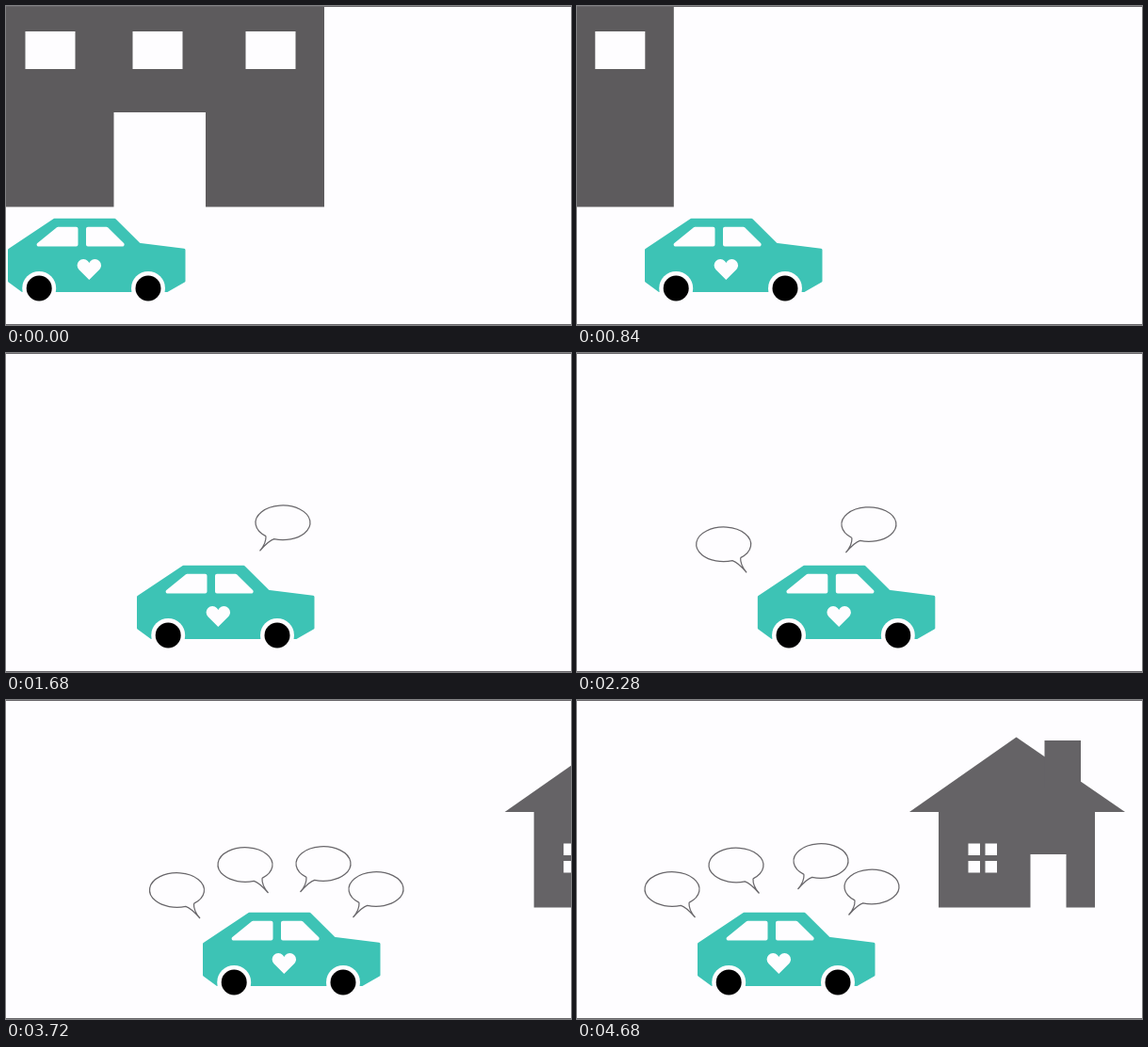
These frames come from a looping animation (600x339 px, 4720 ms). An HTML page with a canvas:

```html
<!DOCTYPE html>
<html lang="en">
<head>
<meta charset="utf-8">
<title>Drive home</title>
<style>
  html, body { margin: 0; width: 100%; height: 100%; overflow: hidden; background: #fefdff; }
  canvas { display: block; width: 600px; height: 339px; }
</style>
</head>
<body>
<canvas id="stage" width="600" height="339"></canvas>
<script>
const ctx = document.getElementById('stage').getContext('2d');
const LOOP = 4720, STEP = 40;
const SETTLE = 3300, RETREAT = 3736, END = 4680;
const PAPER = '#fefdff', TEAL = '#3dc3b5', WALL = '#5d5b5d', HOUSE = '#656366', LINE = '#69676b';

// Each bubble drifts to its hover point, rests, then follows the car back.
const BUBBLES = [
  { side: -1, born: 1360, from: [285.5, 178], hover: [337, 174], to: [259, 171], sag: 6 },
  { side: 1, born: 1740, from: [142, 204], hover: [181.5, 202], to: [101, 201] },
  { side: 1, born: 2400, from: [238, 179], hover: [254, 175], to: [169, 175.5] },
  { side: -1, born: 2740, from: [401, 198], hover: [393, 201], to: [313, 198.5] }
];

const progress = (t, a, b) => Math.min(1, Math.max(0, (t - a) / (b - a)));
const mix = (a, b, u) => a + (b - a) * u;

function carX(t) {
  const forward = 70 * progress(t, 0, 840) + 67 * progress(t, 840, 1680) + 70 * progress(t, 1680, 2475);
  return 2 + forward - 81 * progress(t, RETREAT, END);
}

function bubbleAt({ born, from, hover, to, sag = 0 }, t) {
  const drift = progress(t, born, SETTLE), back = progress(t, RETREAT, END);
  const [x, y] = hover.map((h, i) => mix(mix(from[i], h, drift), to[i], back));
  return [x, y + sag * Math.sin(Math.PI * drift)];
}

function poly(color, ...points) {
  ctx.fillStyle = color;
  ctx.beginPath();
  points.forEach(p => ctx.lineTo(...p));
  ctx.fill();
}

function roundPoly(color, r, ...points) {
  const n = points.length, [sx, sy] = points[0], [ex, ey] = points[n - 1];
  ctx.fillStyle = color;
  ctx.beginPath();
  ctx.moveTo((sx + ex) / 2, (sy + ey) / 2);
  points.forEach((p, i) => ctx.arcTo(...p, ...points[(i + 1) % n], r));
  ctx.closePath();
  ctx.fill();
}

function rect(color, x, y, w, h) {
  ctx.fillStyle = color;
  ctx.fillRect(x, y, w, h);
}

function disc(color, x, y, r) {
  ctx.fillStyle = color;
  ctx.beginPath();
  ctx.arc(x, y, r, 0, Math.PI * 2);
  ctx.fill();
}

function placed(x, y, draw) {
  ctx.save();
  ctx.translate(x, y);
  draw();
  ctx.restore();
}

function building() {
  rect(WALL, -20, 0, 358, 213.5);
  for (const x of [20.5, 134.5, 254.5]) rect(PAPER, x, 27, 53, 40);
  rect(PAPER, 114.5, 113, 97.5, 101);
}

function house() {
  poly(HOUSE, [0, 119], [113.5, 39.5], [229, 119]);
  rect(HOUSE, 143.5, 43, 38.5, 50);
  rect(HOUSE, 31, 118, 166, 102.5);
  rect(PAPER, 128.5, 164, 38, 57);
  for (const x of [62.5, 80.5]) for (const y of [152.5, 171]) rect(PAPER, x, y, 12.5, 12.5);
}

// Two lobes joined by 45-degree sides.
function heart() {
  const d = 6.1, r = 6.6, notch = Math.acos(d / r), PI = Math.PI;
  ctx.fillStyle = PAPER;
  ctx.beginPath();
  ctx.arc(-d, 0, r, 0.75 * PI, 2 * PI - notch);
  ctx.arc(d, 0, r, PI + notch, 2.25 * PI);
  ctx.lineTo(0, r * Math.SQRT2 + d);
  ctx.fill();
}

function car() {
  roundPoly(TEAL, 1.5, [0, 258.5], [49, 225.7], [114, 225.7], [140.5, 252], [188.5, 258], [188.5, 293], [169.5, 304], [15, 304], [0, 293]);
  roundPoly(PAPER, 2, [27, 255.5], [52.5, 234.7], [74.5, 234.7], [74.5, 255.5]);
  roundPoly(PAPER, 2, [83, 234.7], [105.5, 234.7], [126.5, 255.5], [83, 255.5]);
  placed(86.3, 275.6, heart);
  for (const x of [33.2, 149]) {
    disc(PAPER, x, 300, 18);
    disc('#000', x, 300, 13.5);
  }
}

function bubble(side) {
  ctx.scale(-side, 1);
  ctx.beginPath();
  ctx.ellipse(0, 0, 29, 18.3, 0, 2.24, 1.9 + Math.PI * 2);
  ctx.quadraticCurveTo(-15, 19, -24.5, 30);
  ctx.quadraticCurveTo(-17.5, 22, -18, 14.35);
  ctx.closePath();
  ctx.fillStyle = PAPER;
  ctx.fill();
  ctx.strokeStyle = LINE;
  ctx.lineWidth = 1.25;
  ctx.stroke();
}

function draw(t) {
  rect(PAPER, 0, 0, 600, 339);
  placed(-0.28 * t, 0, building);
  placed(353 + 0.184 * (END - t), 0, house);
  placed(carX(t), 0, car);
  for (const b of BUBBLES) {
    if (t >= b.born) placed(...bubbleAt(b, t), () => bubble(b.side));
  }
  for (const y of [0, 338]) rect(LINE, 0, y, 600, 1);
}

const start = performance.now();
function tick() {
  const t = (performance.now() - start) % LOOP;
  draw(Math.floor(t / STEP) * STEP);
  requestAnimationFrame(tick);
}
tick();
</script>
</body>
</html>
```
